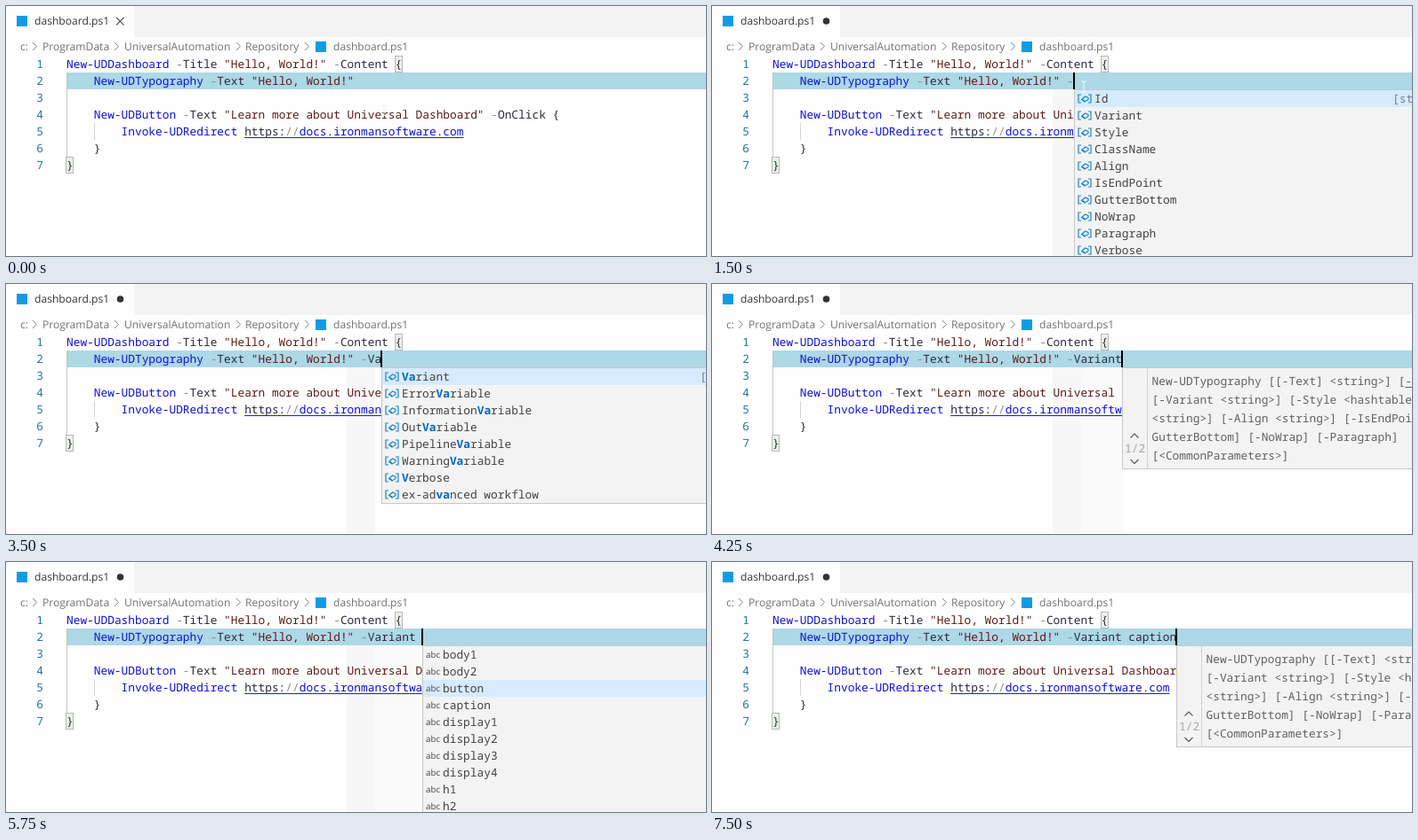
An HTML page for the animation above (7750 ms loop, 787 px wide and 282 px high).

```html
<!DOCTYPE html>
<html lang="en">
<head>
<meta charset="utf-8">
<title>Editor completion</title>
<style>
  html, body { margin: 0; width: 100%; height: 100%; overflow: hidden; background: #fefefe; }
  svg { display: block; width: 787px; height: 282px; }
  text {
    font: 12.83px "Noto Sans Mono", monospace;
    font-variant-ligatures: none;
    text-rendering: geometricPrecision;
    white-space: pre;
    fill: #333;
  }
  .ui { font: 12.1px "Open Sans", sans-serif; fill: #333; }
  .crumb { fill: #717171; }
  .num { fill: #237893; text-anchor: end; }
  .cmd { fill: #1010d0; }
  .param { fill: #2a2a3c; }
  .op { fill: #8f8f8f; }
  .str { fill: #5c1a1a; }
  .label { fill: #424242; }
  .match { fill: #0066bf; font-weight: bold; }
  .hint { fill: #616161; }
  .detail { fill: #7a7f85; }
  .count { fill: #a5a5a5; }
  .abc { font: 9.8px "Open Sans", sans-serif; fill: #444; }
  .line { fill: none; stroke: #555; stroke-width: 1.1; }
  .icon { fill: none; stroke: #1a85c8; stroke-width: 1.2; }
</style>
</head>
<body>
<svg viewBox="0 0 787 282">
  <g id="back"></g>
  <g id="code"></g>
  <g id="live"></g>
</svg>
<script>
const LOOP = 7750, CHAR = 7.698, LEFT = 68, LINE = 19, POPUP = 94;

const esc = s => s.replace(/&/g, '&amp;').replace(/</g, '&lt;');
const rect = (x, y, w, h, fill, more = '') =>
  `<rect x="${x}" y="${y}" width="${w}" height="${h}" fill="${fill}" ${more}/>`;
const path = (d, cls) => `<path d="${d}" class="${cls}"/>`;
const text = (x, y, body, cls = '') => `<text x="${x}" y="${y}" class="${cls}">${body}</text>`;
const span = (cls, s) => `<tspan class="${cls}">${esc(s)}</tspan>`;
const panel = (x, h) => rect(x + .5, POPUP + .5, 800, h, '#f3f3f3', 'stroke="#c8c8c8"');
const baseline = line => 51 + LINE * line;
const column = n => LEFT + CHAR * n;

const cmd = s => span('cmd', s);
const str = s => span('str', `"${s}"`);
const param = s => span('op', ' -') + span('param', s) + ' ';

const lines = [
  [0, cmd('New-UDDashboard') + param('Title') + str('Hello, World!') + param('Content') + '{'],
  [4, cmd('New-UDTypography') + param('Text') + str('Hello, World!')],
  [0, ''],
  [4, cmd('New-UDButton') + param('Text') + str('Learn more about Universal Dashboard') + param('OnClick') + '{'],
  [8, cmd('Invoke-UDRedirect') + ' ' + span('param', 'https:') + span('op', '//') + cmd('docs.ironmansoftware.com')],
  [4, '}'],
  [0, '}']
];

const signature = [
  'New-UDTypography [[-Text] <string>] [-Id <string>]',
  '[-Variant <string>] [-Style <hashtable>] [-ClassName',
  '<string>] [-Align <string>] [-IsEndPoint] [-',
  'GutterBottom] [-NoWrap] [-Paragraph]',
  '[<CommonParameters>]'
];

const lists = {
  params: {
    icon: 'param', detail: '[string]', detailX: 358,
    items: ['Id', 'Variant', 'Style', 'ClassName', 'Align', 'IsEndPoint', 'GutterBottom', 'NoWrap', 'Paragraph', 'Verbose']
  },
  filtered: {
    icon: 'param', detail: '[string]', detailX: 358,
    items: ['Variant', 'ErrorVariable', 'InformationVariable', 'OutVariable', 'PipelineVariable', 'WarningVariable', 'Verbose', 'ex-advanced workflow']
  },
  snippet: {
    icon: 'snippet', detail: 'Example: advanced workflow', detailX: 243,
    items: ['ex-advanced workflow']
  },
  values: {
    icon: 'abc', detail: '', detailX: 0,
    items: ['body1', 'body2', 'button', 'caption', 'display1', 'display2', 'display3', 'display4', 'h1', 'h2']
  }
};

// start, typed text, caret shown, popups, selected row
const steps = [
  [0, '', 0, ''],
  [500, '', 1, ''],
  [1000, ' ', 1, ''],
  [1250, ' ', 1, 'sig'],
  [1500, ' -', 1, 'params'],
  [2000, ' -', 0, 'params'],
  [2250, ' -V', 1, 'filtered'],
  [2500, ' -Va', 1, 'filtered'],
  [2750, ' -Var ', 1, 'sig snippet'],
  [3250, ' -Var ', 0, 'sig snippet'],
  [3500, ' -Va', 1, 'filtered'],
  [4000, ' -Vari', 1, 'filtered'],
  [4250, ' -Variant', 1, 'sig'],
  [4500, ' -Variant ', 1, 'sig'],
  [5000, ' -Variant ', 0, 'values', 0],
  [5500, ' -Variant ', 1, 'values', 0],
  [5750, ' -Variant ', 1, 'values', 2],
  [6000, ' -Variant ', 0, 'values', 3],
  [6500, ' -Variant caption', 1, 'sig'],
  [7000, ' -Variant caption', 0, 'sig'],
  [7500, ' -Variant caption', 1, 'sig']
];

function drawIcon(kind, x, y) {
  if (kind === 'abc') return text(x + 4, y + 3.5, 'abc', 'abc');
  if (kind === 'snippet') return rect(x + 5.5, y - 5.5, 11, 11, 'none', 'stroke="#4b6a88"');
  return path(`M${x + 8} ${y - 4.5}h-3v9h3M${x + 16} ${y - 4.5}h3v9h-3`, 'icon') +
    path(`M${x + 8.5} ${y + 1}l4-3.5 3.5 1.5v2l-4 2.5zl3.5 1`, 'icon');
}

// Emphasises the typed letters in order of appearance.
function mark(label, word) {
  let i = 0;
  return [...label].map(c =>
    i < word.length && c.toLowerCase() === word[i] ? (i++, span('match', c)) : esc(c)).join('');
}

function drawList(kind, x, word, selected = 0) {
  const { icon, items, detail, detailX } = lists[kind];
  const rowY = i => POPUP + 1 + i * LINE;
  let out = panel(x, items.length * LINE + 1);
  out += rect(x + 1, rowY(selected), 800, LINE, '#d6ebff');
  items.forEach((label, i) => {
    out += drawIcon(icon, x, rowY(i) + 9.5) + text(x + 23, rowY(i) + 14, mark(label, word), 'label');
  });
  return out + text(x + detailX, rowY(selected) + 14, detail, 'detail');
}

function drawSignature(x) {
  const chevron = (y, d) => path(`M${x + 9.5} ${y}l4.5 ${d}l4.5 ${-d}`, 'line');
  const textX = x + 33.5;
  return panel(x, 114) +
    rect(x + 28, POPUP + 1, 1, 113, '#d2d2d2') +
    chevron(173.5, -4.5) + chevron(198, 4.5) +
    text(x + 3, 190, '1/2', 'count') +
    signature.map((s, i) => text(textX, 114 + 21 * i, esc(s), 'hint')).join('') +
    rect(textX + CHAR * 37, 116, CHAR * 12, 1, '#616161');
}

function drawPointer(t) {
  if (t >= 2250) return '';
  const [x, y, color] = t < 250 ? [425, 118, '#ececec'] : [418, 91, '#f4fafc'];
  return `<path d="M${x - 3} ${y - 6}h2l1 1 1-1h2M${x} ${y - 5}v10M${x - 3} ${y + 6}h2l1-1 1 1h2" fill="none" stroke="${color}"/>`;
}

function drawBack(t) {
  let out = rect(144, 0, 643, 35, '#f3f3f3');
  if (t >= 1250 && t < 7500) out += rect(383, 94, 32, 188, '#f7f7f7');
  if (t >= 4250 && t < 7500) out += rect(415, 94, 48, 188, '#fafafa');
  return out + (t >= 1000
    ? '<circle cx="128.500" cy="17" r="3.800" fill="#333"/>'
    : path('M124 13l8.5 8.5M132.5 13l-8.5 8.5', 'line'));
}

function drawCode() {
  const badge = (x, y) => rect(x, y, 12, 12, '#109ce4');
  const crumbs = [[16, 'c:'], [41, 'ProgramData'], [133, 'UniversalAutomation'], [269, 'Repository'], [368, 'dashboard.ps1']];
  let out = badge(12, 11) + badge(348, 40) + text(32, 21, 'dashboard.ps1', 'ui');
  out += crumbs.map(([x, s]) => text(x, 50, s, 'ui crumb')).join('');
  out += [30, 122, 259, 336].map(x => `<path d="M${x} 41l4.5 4.5-4.5 4.5" fill="none" stroke="#888"/>`).join('');
  out += rect(LEFT, 75, 719, LINE, '#add8e6');
  out += rect(LEFT, 75, 1, 95, '#c4c4c4') + rect(99, 132, 1, LINE, '#d6d6d6');
  out += [[437.5, 56.5], [67.5, 170.5]].map(([x, y]) =>
    rect(x, y, 8, 18, '#e8f0e8', 'stroke="#b9b9b9"')).join('');
  lines.forEach(([indent, body], i) => {
    out += text(42, baseline(i + 1), i + 1, 'num') + text(column(indent), baseline(i + 1), body);
  });
  return out + rect(column(26), 148, CHAR * 32, 1, '#2020c0');
}

function drawLive(t, [, typed, caret, popups, selected]) {
  const x = Math.round(column(42 + typed.length));
  const word = typed.trim().slice(1).toLowerCase();
  const body = esc(typed).replace('-', span('op', '-'));
  let out = text(column(42), baseline(2), body, 'param');
  for (const kind of popups.split(' ').filter(Boolean)) {
    out += kind === 'sig' ? drawSignature(x) : drawList(kind, x, word, selected);
  }
  if (caret) out += rect(x - 1, 75, 2, LINE, '#000');
  return out + drawPointer(t);
}

const layer = id => document.getElementById(id);
layer('code').innerHTML = drawCode();

let shown = -1;
function render(t) {
  const tick = Math.floor(t / 250) * 250;
  if (tick === shown) return;
  shown = tick;
  layer('back').innerHTML = drawBack(tick);
  layer('live').innerHTML = drawLive(tick, steps.filter(s => s[0] <= tick).pop());
}

const start = performance.now();
function loop() {
  render((performance.now() - start) % LOOP);
  requestAnimationFrame(loop);
}
loop();
</script>
</body>
</html>
```
